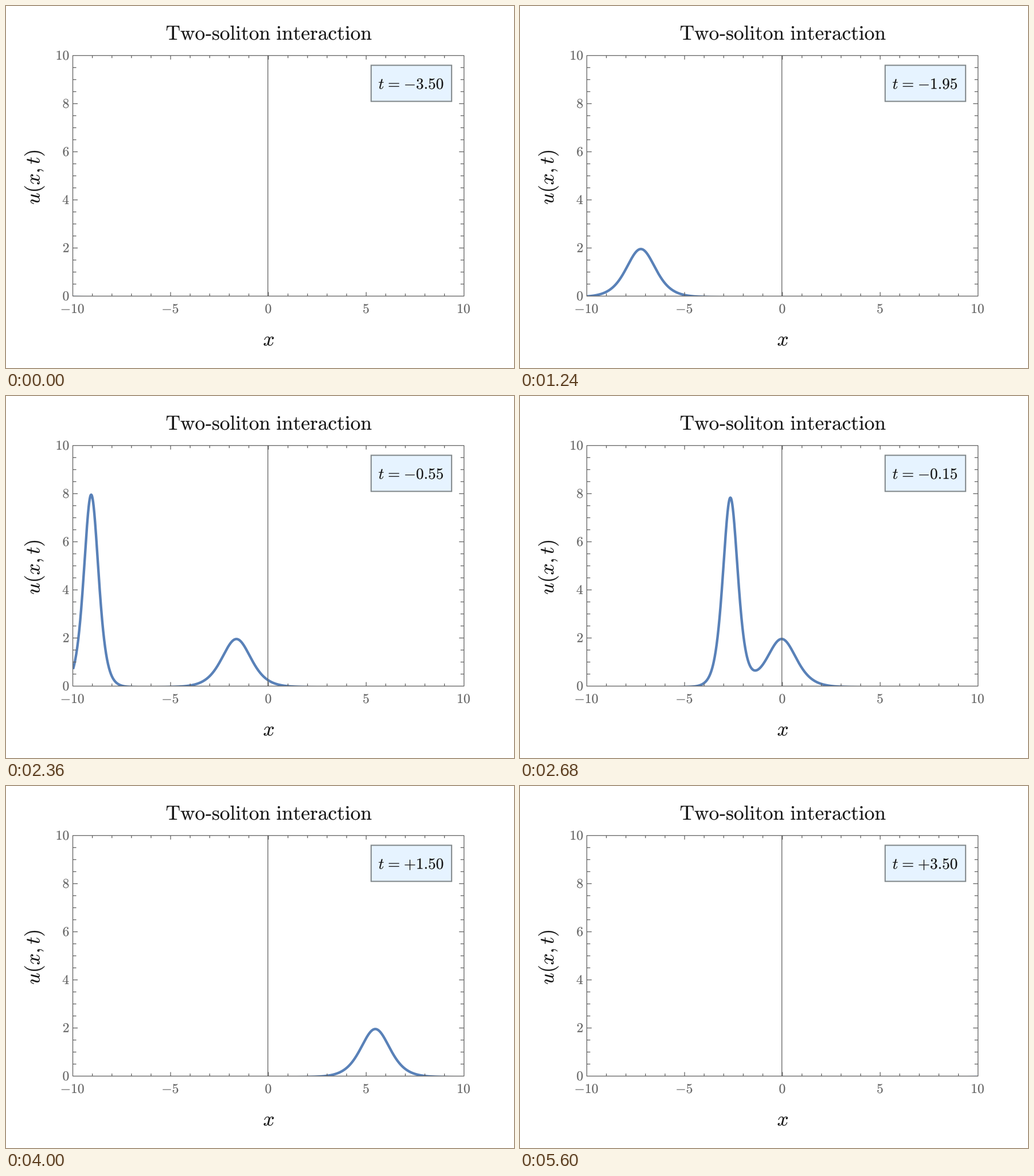
A matplotlib script that plays this animation: 886x632 px, repeating every 5640 ms.

```python
import numpy as np
import matplotlib.pyplot as plt
from matplotlib.animation import FuncAnimation
from matplotlib.collections import LineCollection
from matplotlib.patches import PathPatch, Rectangle
from matplotlib.textpath import TextPath
from matplotlib.transforms import Affine2D

W, H, DPI = 886, 632, 64
PX = 72 / DPI                                   # points per pixel
LEFT, RIGHT, TOP, BOTTOM = 116.5, 798.8, 86.5, 506.5
GRAY, INK, BLUE = "#636363", "#141414", "#5981b8"
FRAMES, STEP, INTERVAL = 141, 0.05, 40
CLOCK_SIZE = 27.2

plt.rcParams["mathtext.fontset"] = "cm"

fig = plt.figure(figsize=(W / DPI, H / DPI), dpi=DPI, facecolor="white")
ax = fig.add_axes([0, 0, 1, 1])
ax.set_xlim(0, W)
ax.set_ylim(H, 0)
ax.axis("off")


def px(x):
    return LEFT + (x + 10) * (RIGHT - LEFT) / 20


def py(u):
    return BOTTOM - u * (BOTTOM - TOP) / 10


def math_path(s, size):
    return TextPath((0, 0), f"${s}$", size=size)


def label(x, y, s, size, color=INK, align=0.5, angle=0, zorder=3):
    """Outlined math text; align 0, 0.5 or 1 anchors its left, middle or right."""
    path = math_path(s, size)
    ink = path.get_extents()
    move = (Affine2D().translate(-ink.x0 - align * ink.width, 0)
            .rotate_deg(angle).scale(1, -1).translate(x, y))
    patch = PathPatch(path, facecolor=color, edgecolor=color, lw=0.2 * PX,
                      snap=False, zorder=zorder, transform=move + ax.transData)
    return ax.add_patch(patch)


def box(x0, y0, x1, y1, lw, **kw):
    patch = Rectangle((x0, y0), x1 - x0, y1 - y0, linewidth=lw * PX,
                      snap=False, **kw)
    return ax.add_patch(patch)


def clock_text(t):
    return rf"t\hspace{{0.08}}=\hspace{{0.08}}{{{t:+.2f}}}"


def two_soliton(x, t):
    """KdV solution with wave numbers 1 and 2."""
    num = 3 + 4 * np.cosh(2 * x - 8 * t) + np.cosh(4 * x - 64 * t)
    den = 3 * np.cosh(x - 28 * t) + np.cosh(3 * x - 36 * t)
    return 12 * num / den**2


def draw_axes():
    lines = [[(456.7, TOP), (456.7, BOTTOM)]]
    for n in range(-9, 10):
        x, size = px(n), 7 if n % 5 == 0 else 4.5
        lines += [[(x, BOTTOM), (x, BOTTOM - size)], [(x, TOP), (x, TOP + size)]]
    for n in range(1, 20):
        y, size = py(n / 2), 8.5 if n % 4 == 0 else 6
        lines += [[(LEFT, y), (LEFT + size, y)], [(RIGHT, y), (RIGHT - size, y)]]
    ticks = LineCollection(lines, colors=GRAY, linewidths=1.3 * PX, zorder=3)
    ticks.set_snap(False)
    ax.add_collection(ticks)
    box(LEFT, TOP, RIGHT, BOTTOM, 1.3, fill=False, edgecolor=GRAY, zorder=3)

    for n in range(-10, 11, 5):
        label(px(n) - 0.3, 536, n, 23.5, GRAY)
    for n in range(0, 11, 2):
        label(109.3, py(n) + 7.3, n, 23.5, GRAY, align=1)


draw_axes()
label(458.6, 59, "\\mathrm{Two\u2010soliton\\ interaction}", 35.3)
label(458.3, 593, "x", 35.3)
label(58.5, 299.3, "u(x,t)", 35.5, angle=90)

box(636.8, 103.5, 777.2, 166.5, 2, facecolor="#e6f3ff", edgecolor="#7f8689", zorder=4)
clock = label(650.2, 144.7, clock_text(0), CLOCK_SIZE, align=0, zorder=5)

xs = np.linspace(-10, 10, 1601)
clip = Rectangle((LEFT, TOP), RIGHT - LEFT, BOTTOM - TOP, transform=ax.transData)
curve, = ax.plot([], [], color=BLUE, lw=4.4 * PX, solid_capstyle="butt",
                 solid_joinstyle="round", zorder=2)
curve.set_clip_path(clip)


def update(i):
    t = (i - FRAMES // 2) * STEP
    # the stroke rests just below the frame line
    curve.set_data(px(xs) + 0.5, py(two_soliton(xs, t)) + 1.8)
    clock.set_path(math_path(clock_text(t), CLOCK_SIZE))
    return curve, clock


anim = FuncAnimation(fig, update, frames=FRAMES, interval=INTERVAL,
                     repeat=True, repeat_delay=0, blit=False)
plt.show()
```
